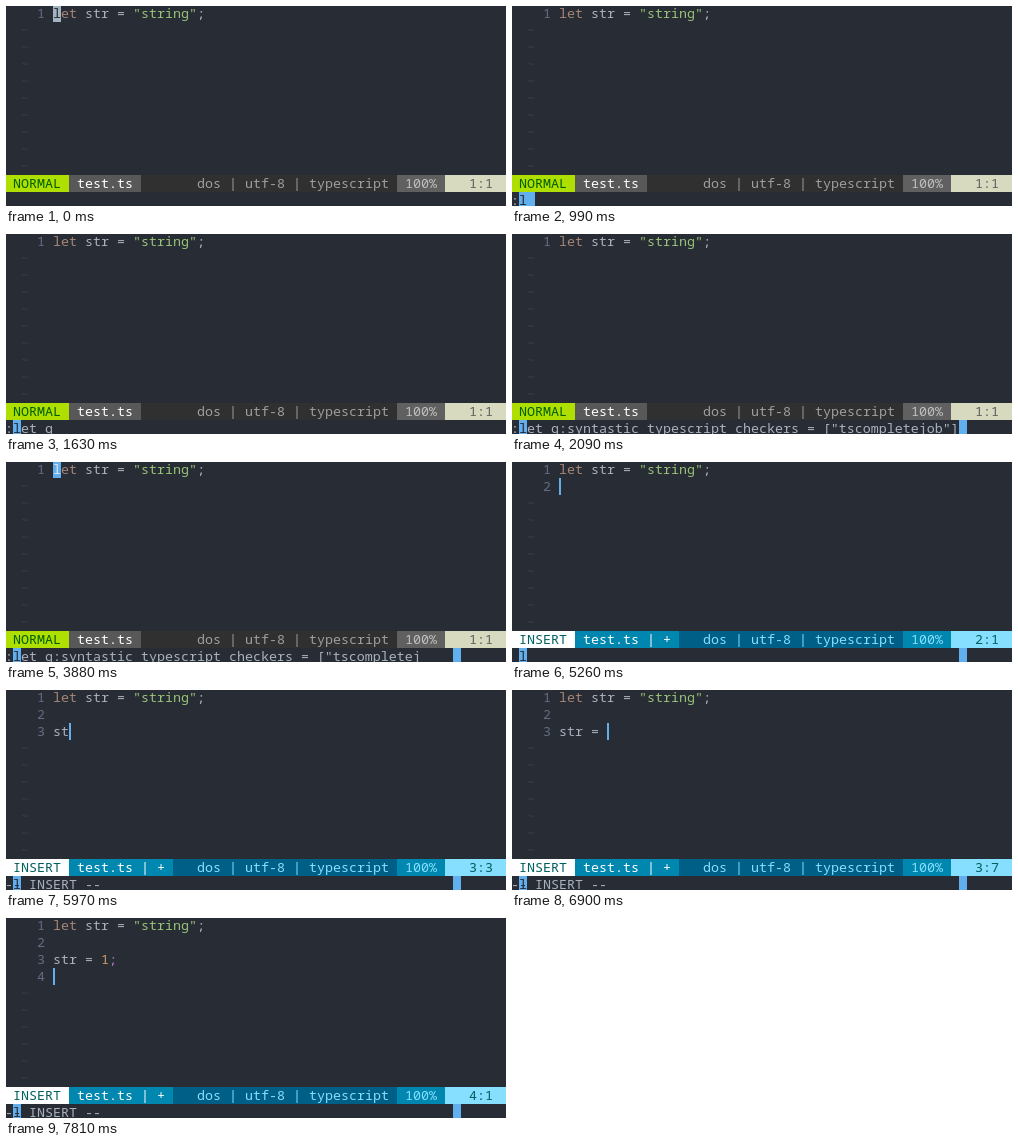
Animation of 500 by 200 pixels, one loop 8 s. Source, as an HTML page:

```html
<!DOCTYPE html>
<html lang="en">
<head>
<meta charset="utf-8">
<title>Editor session</title>
<style>
  html, body { margin: 0; width: 100%; height: 100%; overflow: hidden; background: #282c34; }
  svg { display: block; width: 500px; height: 200px; }
  text { font: 13.3333px "Noto Sans Mono", "DejaVu Sans Mono", monospace; white-space: pre; font-variant-ligatures: none; }
  .b { font-weight: 500; }
</style>
</head>
<body>
<svg id="stage" viewBox="0 0 500 200"></svg>
<script>
const LOOP = 8000, COLS = 63, STATUS = 10, CMD = 11;
const FG = '#abb2bf', DIM = '#636d83', TILDE = '#3b4048', BLUE = '#61afef', BG = '#282c34';
const KEYWORD = '#a68676', STRING = '#98c379', NUMBER = '#d19a66', END = '#b07cc6';

const NORMAL = {
  name: 'NORMAL', mode: ['#afdf00', '#005f00'], file: ['#585858', '#ffffff'],
  mid: ['#303030', '#9e9e9e'], pct: ['#606060', '#c0c0c0'], pos: ['#d7dabf', '#606060']
};
const INSERT = {
  name: 'INSERT', mode: ['#ffffff', '#005f5f'], file: ['#0087af', '#ffffff'],
  mid: ['#005f87', '#87dfff'], pct: ['#0087af', '#87dfff'], pos: ['#87dfff', '#005f5f']
};

const COMMAND = ':let g:syntastic_typescript_checkers = ["tscompletejob"]';
// [time, visible characters of the command line]
const COMMAND_KEYS = [[130, 1], [990, 2], [1140, 3], [1310, 4], [1630, 6], [2090, 56], [2960, 52]];
const TYPED = 'str = 1;';
const TYPED_KEYS = [5720, 5970, 6270, 6500, 6730, 6900, 7050, 7430];

const stage = document.getElementById('stage');
const colX = col => col * 8 - 1;
const rowY = row => row * 17 - 1;
const within = (t, a, b) => t >= a && t < b;

const box = (col, row, cols, fill, width = cols * 8) =>
  `<rect x="${colX(col)}" y="${rowY(row)}" width="${width}" height="17" fill="${fill}"/>`;
const text = (col, row, str, fill, cls = '') =>
  `<text x="${colX(col)}" y="${rowY(row) + 13}" fill="${fill}" class="${cls}">${str}</text>`;

function statusLine(theme, file, pos) {
  const part = (from, to, [bg, fg], col, str, cls) =>
    box(from, STATUS, to - from, bg) + text(col, STATUS, str, fg, cls);
  const fileEnd = 10 + file.length;
  return part(0, 8, theme.mode, 1, theme.name, 'b') +
    part(8, fileEnd, theme.file, 9, file, 'b') +
    part(fileEnd, 49, theme.mid, 24, 'dos | utf-8 | typescript') +
    part(49, 55, theme.pct, 50, '100%') +
    part(55, COLS, theme.pos, 58, pos);
}

function commandLine(t) {
  if (t < 130) return '';
  const inserting = t >= 4110;
  const cleared = within(t, 5260, 5340);
  let out = '';
  if (!inserting) {
    const shown = COMMAND_KEYS.filter(k => k[0] <= t).pop()[1];
    out += text(0, CMD, COMMAND.slice(0, shown), FG);
  } else if (!cleared) {
    out += text(0, CMD, '-- INSERT --', FG);
  }
  // cursor cells that stay painted after the cursor has moved on
  out += box(1, CMD, 1, BLUE);
  if (t >= 990) out += text(1, CMD, 'l', BG);
  if (inserting && !cleared) out += text(1, CMD, '-', BG);
  if (within(t, 990, 1140)) out += box(2, CMD, 1, BLUE);
  if (within(t, 1460, 1630)) out += box(5, CMD, 1, BLUE);
  if (t >= 2090) out += box(56, CMD, 1, BLUE);
  return out;
}

function draw(t) {
  const inserting = t >= 4110;
  const lines = t >= 7810 ? 4 : t >= 5490 ? 3 : inserting ? 2 : 1;
  const typed = TYPED_KEYS.filter(k => k <= t).length;
  const col = lines === 3 ? typed : 0;

  let out = box(0, 0, COLS, BG);
  for (let row = 0; row < STATUS; row++) {
    out += row < lines ? text(4, row, row + 1, DIM) : text(2, row, '~', TILDE);
  }
  out += text(6, 0, 'let', KEYWORD) + text(10, 0, 'str =', FG) +
    text(16, 0, '"string"', STRING) + text(24, 0, ';', FG);
  [...TYPED.slice(0, typed)].forEach((ch, i) => {
    out += text(6 + i, 2, ch, ch === '1' ? NUMBER : ch === ';' ? END : FG);
  });

  if (inserting) {
    out += box(6 + col, lines - 1, 1, BLUE, 2);
  } else if (t < 130) {
    out += box(6, 0, 1, '#a3b3c2') + text(6, 0, 'l', BG);
  } else if (t >= 2960) {
    out += box(6, 0, 1, BLUE) + text(6, 0, 'l', within(t, 3650, 3880) ? BG : '#dce6ee');
  }

  const pos = `${lines}:${col + 1}`;
  return out + (inserting ? statusLine(INSERT, 'test.ts | +', pos) : statusLine(NORMAL, 'test.ts', pos)) +
    commandLine(t);
}

let last = '';
function tick() {
  const markup = draw(performance.now() % LOOP);
  if (markup !== last) stage.innerHTML = last = markup;
  requestAnimationFrame(tick);
}
tick();
</script>
</body>
</html>
```
